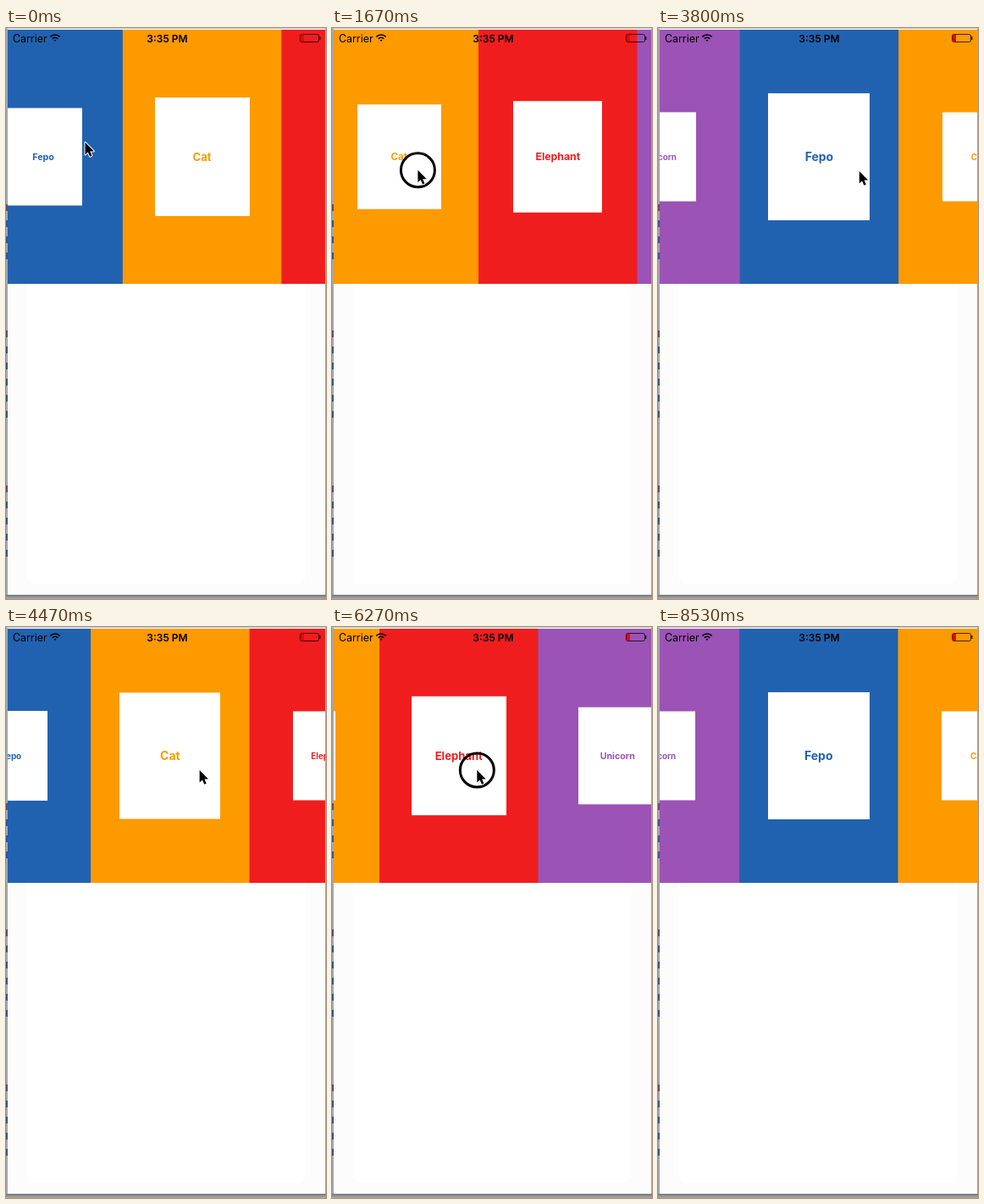
An HTML page with a canvas for the animation above (8.59 s loop, 378x674 px).

```html
<!DOCTYPE html>
<html lang="en">
<head>
<meta charset="utf-8">
<title>Carousel</title>
<style>
  html, body { margin: 0; width: 100%; height: 100%; overflow: hidden; background: #fff; }
  canvas { display: block; width: 378px; height: 674px; }
</style>
</head>
<body>
<canvas id="stage" width="378" height="674"></canvas>
<script>
const ctx = document.getElementById('stage').getContext('2d');
const LOOP = 8590, STEP = 200 / 3;
const CELL = 187.5, CENTER = 189.75, MIDDLE = 152;
const FONT = 'Inter, Roboto, sans-serif';
const cards = [
  ['Fepo', '#2162b0'],
  ['Cat', '#fd9a00'],
  ['Elephant', '#f01d1f'],
  ['Unicorn', '#9b53b6']
];

// Each swipe drags for DRAG ms, then glides to the next page after release.
const DRAG = 260, PULL = 0.65, GLIDE = 120;
const DRAG_FROM = 212, DRAG_TO = 90, OVERSHOOT = 235;
const releases = [-54, 1691, 2511, 3250, 4133, 5715, 6440, 7148];

const arrow = new Path2D('M0 0V14.5L3.3 11.4 5.6 16.8 8 15.7 5.8 10.5H10.3Z');

const clamp = v => Math.max(0, Math.min(1, v));
const smooth = u => u * u * (3 - 2 * u);
const mix = (a, b, u) => a + (b - a) * u;
const dragPart = (t, release) => clamp((t - release + DRAG) / DRAG);

function scrollAt(t) {
  return releases.reduce((sum, r) => sum + (t < r
    ? PULL * dragPart(t, r)
    : 1 - (1 - PULL) * Math.exp((r - t) / GLIDE)), 0);
}

// Between swipes the pointer swings out to the right and comes back to press.
function pointerAt(t) {
  const y = 169 - 34 * Math.exp(-t / 500);
  const next = releases.find(r => r > t);
  const last = releases.findLast(r => r <= t);
  if (!next) return { x: mix(DRAG_TO, 400, smooth(clamp((t - last) / 1050))), y };
  const drag = dragPart(t, next);
  if (drag > 0) return { x: mix(DRAG_FROM, DRAG_TO, drag), y, down: true };
  const u = (t - last) / (next - DRAG - last);
  const swing = OVERSHOOT * Math.sin(Math.PI * u) ** 2;
  return { x: mix(DRAG_TO, DRAG_FROM, smooth(u)) + swing, y };
}

function rect(x, y, w, h, color) {
  ctx.fillStyle = color;
  ctx.fillRect(x, y, w, h);
}

function text(label, x, y, size, weight, color, align) {
  ctx.font = `${weight} ${size}px ${FONT}`;
  ctx.textAlign = align;
  ctx.fillStyle = color;
  ctx.fillText(label, x, y);
}

function drawBackdrop() {
  rect(0, 0, 378, 674, '#a6a6a6');
  // Line starts of the paragraphs behind the window
  for (const [top, lines] of [[208, 4], [357, 6], [540, 5]]) {
    for (let i = 0; i < lines; i++) rect(0, top + i * 19, 2, 8, i ? '#3a5584' : '#6a4a60');
  }
  const shade = ctx.createLinearGradient(0, 669, 0, 674);
  shade.addColorStop(0, '#777');
  shade.addColorStop(1, '#ababab');
  rect(0, 669, 378, 5, shade);
  rect(0, 0, 378, 1, '#c4c4c4');
  rect(2, 1, 375, 668, '#fcfcfc');
  ctx.beginPath();
  ctx.roundRect(25, 290, 328, 366, 8);
  ctx.fillStyle = '#fff';
  ctx.fill();
}

function drawCell(index, scroll) {
  const [label, color] = cards[((index % 4) + 4) % 4];
  const offset = (index - scroll) * CELL;
  const scale = 1 - 0.3 * Math.min(1, Math.abs(offset) / CELL);
  const x = CENTER + offset;
  const left = Math.round(x - 60 * scale), right = Math.round(x + 60 * scale);
  rect(x - CELL / 2, 2, CELL + 1, 300, color);
  rect(left, MIDDLE - 75 * scale, right - left, 150 * scale, '#fff');
  text(label, x, MIDDLE + 5 * scale, 14 * scale, 700, color, 'center');
}

function drawCarousel(scroll) {
  ctx.save();
  ctx.beginPath();
  ctx.rect(2, 2, 375, 300);
  ctx.clip();
  const first = Math.floor(scroll) - 1;
  for (let i = first; i < first + 4; i++) drawCell(i, scroll);
  ctx.restore();
}

function drawStatusBar() {
  text('Carrier', 8, 17, 12.4, 400, '#000', 'left');
  text('3:35 PM', 190.5, 17, 12, 600, '#000', 'center');

  ctx.strokeStyle = '#000';
  ctx.lineWidth = 1.7;
  for (let r = 1.2; r < 9; r += 3.4) {
    ctx.beginPath();
    ctx.arc(58, 16, r, -Math.PI * 0.75, -Math.PI * 0.25);
    ctx.stroke();
  }

  ctx.lineWidth = 1;
  ctx.strokeStyle = 'rgba(0,0,0,.75)';
  ctx.beginPath();
  ctx.roundRect(347.5, 7.5, 22, 9, 2);
  ctx.stroke();
  rect(348, 8, 4, 8, '#ff0000');
  rect(370, 10, 1.5, 4, 'rgba(0,0,0,.75)');
}

function drawPointer({ x, y, down }) {
  ctx.save();
  ctx.translate(x, y);
  if (down) {
    ctx.beginPath();
    ctx.arc(0, 0, 20, 0, Math.PI * 2);
    ctx.strokeStyle = '#000';
    ctx.lineWidth = 3;
    ctx.stroke();
  }
  ctx.lineJoin = 'round';
  ctx.strokeStyle = '#fff';
  ctx.lineWidth = 2;
  ctx.stroke(arrow);
  ctx.fillStyle = '#000';
  ctx.fill(arrow);
  ctx.restore();
}

function render(now) {
  const t = Math.floor((now % LOOP + 3.5) / STEP) * STEP;
  drawBackdrop();
  drawCarousel(scrollAt(t));
  drawStatusBar();
  drawPointer(pointerAt(t));
}

const start = performance.now();
function tick() {
  render(performance.now() - start);
  requestAnimationFrame(tick);
}
tick();
</script>
</body>
</html>
```
